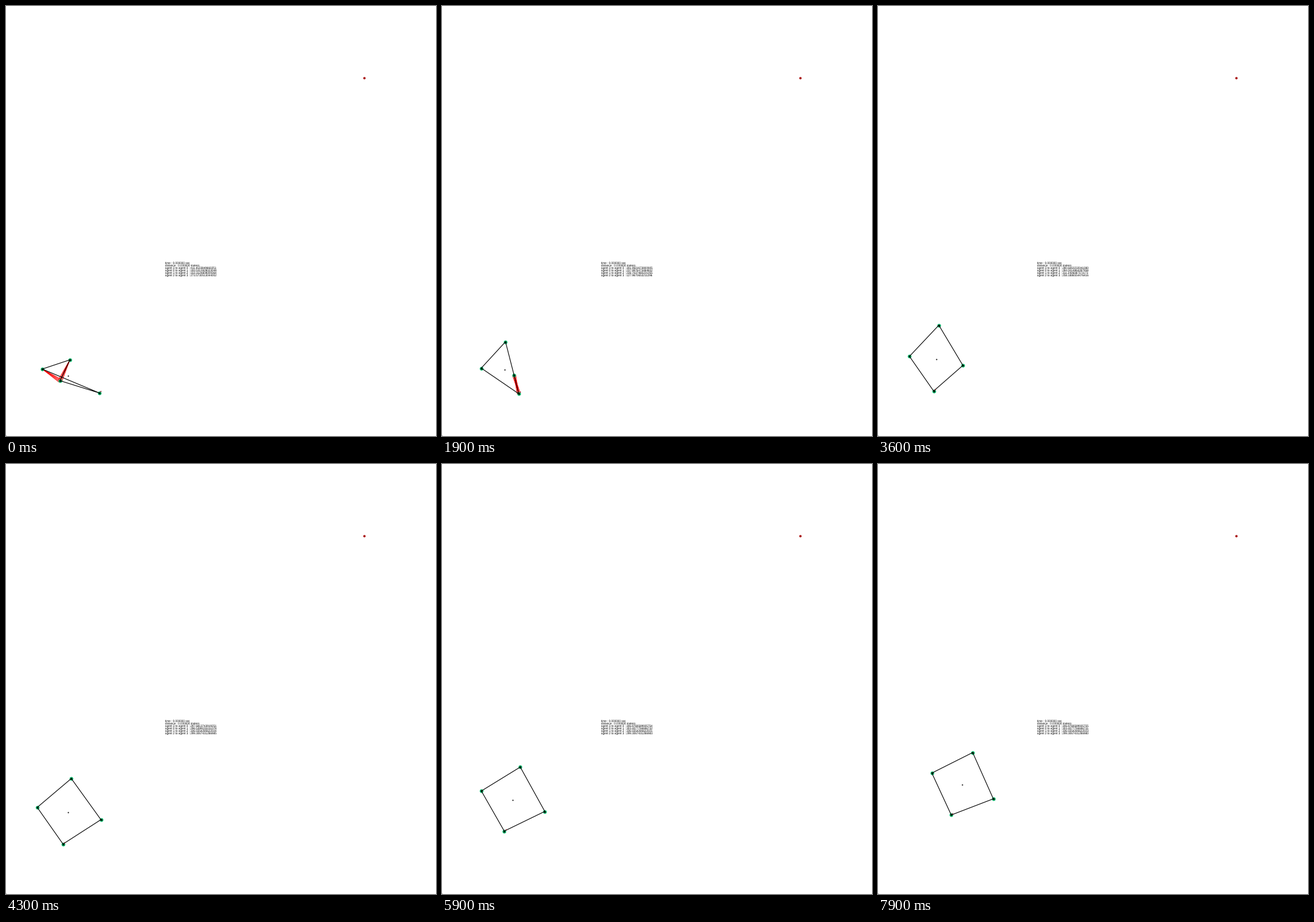
Animation, 700 px wide and 700 px high, one loop 8000 ms. Source, as a matplotlib script:

```python
import numpy as np
import matplotlib.pyplot as plt
from matplotlib.animation import FuncAnimation
from matplotlib.collections import LineCollection

SIZE, DPI = 700, 100
FRAMES, INTERVAL = 80, 100
PX = 72 / DPI  # points per pixel
METRIC = 4.08  # distance units per pixel

plt.rcParams["text.hinting"] = "none"

# Positions are complex numbers, x + y*1j, with y pointing down.
# Each agent moves from its start to a slot on a slowly turning square.
START = np.array([59 + 591j, 104 + 576j, 88 + 610j, 152 + 630j])
RADIUS = np.array([53, 55.5, 55.5, 52])
BEARING = np.array([1, 87.5, 183.5, 269.5])
ARRIVAL = np.array([46, 28, 43, 36])
BULGE = np.array([8.5 + 5j, 0, -2 + 1j, -2j])  # sideways sway on the way

# Path of the formation's middle
TIMES = np.array([0, 6, 19, 36, 50, 67, 79])
MIDDLE = np.array([100.75 + 601.75j, 103.5 + 598.5j, 102 + 592.5j,
                   95.6 + 575j, 107 + 559j, 122.75 + 537j, 137 + 522.5j])
SLOPE = np.gradient(MIDDLE, TIMES)

SENSORS = [(0, 2), (1, 2), (2, 3), (3, 2)]  # (watching, watched)
SENSOR_RANGE = 41
RAYS = np.linspace(-0.08, 0.08, 4)


def middle_at(t):
    """Cubic Hermite curve through the middle's key points."""
    k = min(np.searchsorted(TIMES, t, side="right") - 1, len(TIMES) - 2)
    h = TIMES[k + 1] - TIMES[k]
    u = (t - TIMES[k]) / h
    ease = u * u * (3 - 2 * u)
    return (MIDDLE[k] * (1 - ease) + MIDDLE[k + 1] * ease
            + h * u * (1 - u) * ((1 - u) * SLOPE[k] - u * SLOPE[k + 1]))


def slots_at(t):
    u = np.clip((t - 20) / 60, 0, 1)
    turn = 183 + 17.5 * u * u * (3 - 2 * u)
    return RADIUS * np.exp(1j * np.radians(turn + BEARING))


LEAD = START - middle_at(0) - slots_at(0)


def agents_at(t):
    u = np.minimum(t / ARRIVAL, 1)
    return (middle_at(t) + slots_at(t)
            + LEAD * (1 - u) + BULGE * 4 * u * (1 - u))


def xy(z):
    z = np.atleast_1d(z)
    return z.real, z.imag


def sensor_rays(pos):
    segments = []
    for a, b in SENSORS:
        gap = pos[b] - pos[a]
        if abs(gap) < SENSOR_RANGE:
            tips = pos[a] + gap * np.exp(1j * RAYS)
            segments += [np.column_stack(xy([pos[a], tip])) for tip in tips]
    return segments


fig = plt.figure(figsize=(SIZE / DPI, SIZE / DPI), dpi=DPI, facecolor="white")
ax = fig.add_axes([0, 0, 1, 1])
ax.set_xlim(0, SIZE)
ax.set_ylim(SIZE, 0)
ax.axis("off")


def dots(color, size, z, at=()):
    line, = ax.plot(*xy(np.array(at, complex)), "o", color=color,
                    ms=size * PX, mew=0, zorder=z, snap=False)
    return line


rays = LineCollection([], colors="red", linewidths=PX, zorder=2)
ax.add_collection(rays)
links, = ax.plot([], [], color="black", lw=1.1 * PX, zorder=4)
bodies = dots("#00b265", 6, 3)
cores = dots("black", 2.8, 5)
heading = dots("#8c1020", 1.8, 6)
center = dots("black", 2, 5)
dots("#a80000", 3.8, 5, [583.2 + 116.6j])  # goal
dots("#555555", 2, 5, [SIZE * 1j])

labels = [ax.text(259, 418.5 + 3.9 * i, "", family="Liberation Sans",
                  fontsize=4.6 * PX, va="center_baseline", color="black")
          for i in range(6)]
labels[0].set_text("time : 0.000000 sec")
labels[1].set_text("distance : 0.000000 meters")


def update(i):
    pos = agents_at(i)
    rays.set_segments(sensor_rays(pos))
    links.set_data(*xy(np.append(pos, pos[0])))
    bodies.set_data(*xy(pos))
    cores.set_data(*xy(pos))
    heading.set_data(*xy(pos[3] + 2.2 - 2.8j))
    center.set_data(*xy(pos.mean()))
    for k, label in enumerate(labels[2:]):
        a = (k - 1) % 4
        dist = METRIC * abs(pos[k] - pos[a])
        label.set_text(f"agent {a} to agent {k} : {dist:.13f}")
    return [rays, links, bodies, cores, heading, center, *labels]


anim = FuncAnimation(fig, update, frames=FRAMES, interval=INTERVAL,
                     repeat=True, repeat_delay=0)
plt.show()
```
